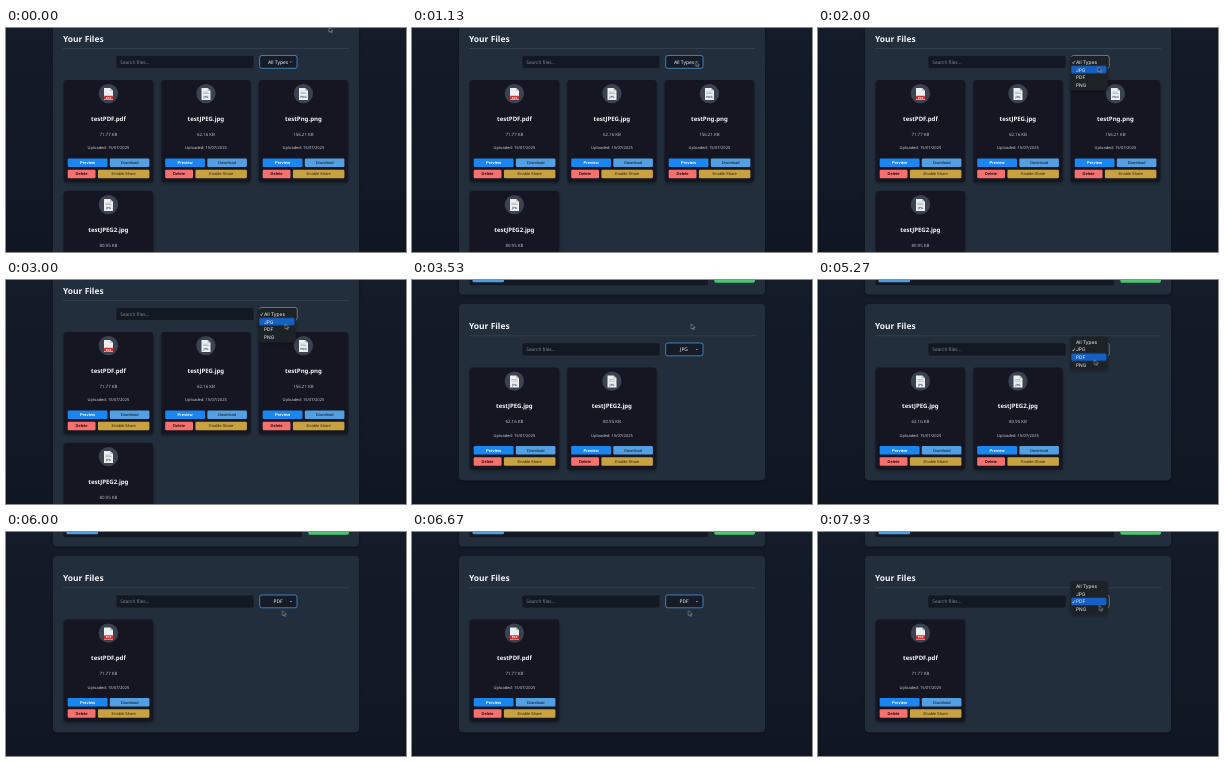
An HTML page for the animation above (8000 ms loop, 400 by 224 pixels).

```html
<!DOCTYPE html>
<html lang="en">
<head>
<meta charset="utf-8">
<title>Your Files</title>
<style>
  html, body { margin: 0; width: 100%; height: 100%; overflow: hidden; background: #121824; }
  svg { display: block; width: 100vw; height: 100vh; }
  text { font-family: "Noto Sans", "Open Sans", sans-serif; text-rendering: geometricPrecision; }
  .bold { font-weight: 700; }
  .mid { text-anchor: middle; }
  .menu text { font-family: Inter, Roboto, sans-serif; }
  .btn { font-family: "Liberation Sans", Arial, sans-serif; }

  .view, .menu { visibility: hidden; animation: 8s step-end infinite; }
  #all { animation-name: all; }
  #jpg { animation-name: jpg; }
  #pdf { animation-name: pdf; }
  #menuAll { animation-name: menuAll; }
  #menuJpg { animation-name: menuJpg; }
  #menuPdf { animation-name: menuPdf; }
  #cursor { animation: move 8s ease-in-out infinite; }

  @keyframes all { 0% { visibility: visible } 39.125%, 100% { visibility: hidden } }
  @keyframes jpg { 0% { visibility: hidden } 39.125% { visibility: visible } 70%, 100% { visibility: hidden } }
  @keyframes pdf { 0% { visibility: hidden } 70%, 100% { visibility: visible } }
  @keyframes menuAll { 0% { visibility: hidden } 19.125% { visibility: visible } 38.4%, 100% { visibility: hidden } }
  @keyframes menuJpg { 0% { visibility: hidden } 55.875% { visibility: visible } 69.2%, 100% { visibility: hidden } }
  @keyframes menuPdf { 0% { visibility: hidden } 95%, 100% { visibility: visible } }

  /* the highlight jumps one row down as the pointer crosses it */
  .menu .bar { animation: 8s step-end infinite; }
  #menuAll .bar { animation-name: barAll; }
  #menuJpg .bar { animation-name: barJpg; }
  @keyframes barAll { 0% { transform: translateY(0) } 22.6%, 100% { transform: translateY(7.6px) } }
  @keyframes barJpg { 0% { transform: translateY(0) } 60%, 100% { transform: translateY(7.6px) } }

  @keyframes move {
    0%, .875% { transform: translate(323.2px, -.8px) }
    7.5%, 12.5% { transform: translate(284px, 33px) }
    19.125% { transform: translate(281px, 35px) }
    24.5%, 26% { transform: translate(280.2px, 38.8px) }
    33.375%, 46.625% { transform: translate(279.3px, 44px) }
    54%, 56.5% { transform: translate(278px, 69px) }
    64.5%, 68.4% { transform: translate(276.5px, 79.8px) }
    74%, 83.375% { transform: translate(276.5px, 78.6px) }
    93%, 95% { transform: translate(281px, 69.5px) }
    99%, 100% { transform: translate(281.3px, 73.6px) }
  }
</style>
</head>
<body>
<svg id="stage" viewBox="0 0 400 224" preserveAspectRatio="none">
  <defs>
    <linearGradient id="page" x1="0" y1="0" x2="0" y2="1">
      <stop offset="0" stop-color="#141b29"/><stop offset="1" stop-color="#111722"/>
    </linearGradient>
    <filter id="shade" x="-10%" y="-10%" width="120%" height="125%">
      <feDropShadow dx="0" dy="1.2" stdDeviation="1.6" flood-color="#05080d" flood-opacity=".35"/>
    </filter>
  </defs>
  <rect width="400" height="224" fill="url(#page)"/>
  <g id="scene"></g>
  <path id="cursor" d="M0 0V5L1.2 3.9 2 5.7 2.9 5.3 2.1 3.6H3.7Z" fill="#0b0d10" stroke="#d5dade" stroke-width=".45" stroke-linejoin="round"/>
</svg>
<script>
  const SHIFT = 35.5, ROW = 7.6, SELECT_Y = 34;
  const TYPES = ['All Types', 'JPG', 'PDF', 'PNG'];
  const FILES = {
    pdf: ['testPDF.pdf', '71.77 KB'],
    jpeg: ['testJPEG.jpg', '62.16 KB'],
    png: ['testPng.png', '156.21 KB'],
    jpeg2: ['testJPEG2.jpg', '80.95 KB']
  };

  const rect = (x, y, w, h, fill, r = 0, extra = '') =>
    `<rect x="${x}" y="${y}" width="${w}" height="${h}" rx="${r}" fill="${fill}" ${extra}/>`;
  const text = (x, y, size, str, cls = '', fill = '#f2f5f8') =>
    `<text x="${x}" y="${y}" font-size="${size}" class="${cls}" fill="${fill}">${str}</text>`;
  const button = (x, y, w, fill, label, ink, cls = '') =>
    rect(x, y, w, 8.4, fill, 1.2) + text(x + w / 2, y + 5.6, 4, label, 'mid btn ' + cls, ink);

  function icon(type) {
    const page = '<path d="M40.2 8H46.4L49.2 10.8V20H40.2Z" fill="#eceff1"/>' +
      '<path d="M46.4 8V10.8H49.2Z" fill="#b4bcc4"/>';
    const label = type === 'pdf'
      ? rect(40.2, 15.8, 9, 3.8, '#d8322f', .4) + text(44.7, 18.8, 2.8, 'PDF', 'mid bold')
      : rect(41.6, 11.8, 5.2, .6, '#9aa3ab') + rect(41.6, 13.3, 6.2, .6, '#9aa3ab') +
        text(44.7, 18.4, 3, type === 'png' ? 'PNG' : 'JPG', 'mid bold', '#4d565f');
    return '<circle cx="44.6" cy="13.6" r="9.7" fill="#3a434f"/>' + page + label;
  }

  function card(key, i) {
    const [name, size] = FILES[key];
    const x = 57.8 + (i % 3) * 97.5, y = 52 + Math.floor(i / 3) * 111;
    return `<g transform="translate(${x} ${y})">` +
      rect(0, 0, 89.3, 102.3, '#131923', 3, 'filter="url(#shade)"') +
      icon(key) +
      text(44.6, 40.5, 6.05, name, 'mid bold') +
      text(44.6, 55.5, 4.4, size, 'mid', '#b3bbc4') +
      text(44.6, 69.3, 4, 'Uploaded: 15/07/2025', 'mid', '#c3cad1') +
      button(3.9, 78.5, 39.8, '#1a86ef', 'Preview', '#fff', 'bold') +
      button(46, 78.5, 39.6, '#529fe2', 'Download', '#0c1826') +
      button(3.9, 89.8, 27.8, '#f6716e', 'Delete', '#25090c', 'bold') +
      button(34.1, 89.8, 51.5, '#c8a140', 'Enable Share', '#33290f') + '</g>';
  }

  // Bottom edge of the upload panel above the list
  const upload = () =>
    rect(47, -20, 306, 34.6, '#232d3a', 4, 'filter="url(#shade)"') +
    rect(57.5, -10, 238.5, 15.2, '#131923', 1.5) +
    rect(60.5, -10, 31.5, 12.2, '#4f9ee3', 1.2) +
    rect(302.3, -10, 40.7, 12.8, '#4ec671', 1.8);

  function view(id, choice, files, scrolled) {
    return `<g class="view" id="${id}">` + (scrolled ? '' : upload()) +
      `<g transform="translate(0 ${scrolled ? 0 : SHIFT})">` +
      rect(47, -11.5, 306, scrolled ? 300 : 176.3, '#232d3a', 4, 'filter="url(#shade)"') +
      text(57, 13.7, 8.45, 'Your Files', 'bold') +
      rect(57, 20, 286, .7, '#3b4653') +
      rect(110, 27.5, 138, 13, '#131923', 2, 'stroke="#2c3643" stroke-width=".5"') +
      text(114.3, 35.6, 4.75, 'Search files...', '', '#7e8894') +
      rect(253.7, 27.5, 37.3, 12.8, '#151c27', 2, 'stroke="#4d9be0" stroke-width=".75"') +
      text(272, 35.8, 4.9, choice, 'mid') +
      '<path d="M284.1 33.5L285 34.4 285.9 33.5" fill="none" stroke="#d4dae0" stroke-width=".6"/>' +
      files.map(card).join('') + '</g></g>';
  }

  function menu(id, picked, y) {
    const top = y - picked * ROW;
    const items = TYPES.map((type, i) => text(258, top + i * ROW + 1.9, 4.85, type)).join('');
    return `<g class="menu" id="${id}">` +
      rect(253.7, y - 6.5, 37.3, 12.8, '#151c27', 2, 'stroke="#98a1aa" stroke-width=".5"') +
      rect(252.4, top - 5.3, 37.2, ROW * 4 + 3, '#1d2026', 2, 'stroke="#2b3038" stroke-width=".3" filter="url(#shade)"') +
      rect(253.3, y - 3.8, 35.2, ROW, '#1660c4', 1.2, 'class="bar"') + items +
      `<path d="M254.4 ${y + .4}l.9 1.2 1.5 -2.8" fill="none" stroke="#fff" stroke-width=".55"/></g>`;
  }

  document.getElementById('scene').innerHTML =
    view('all', 'All Types', ['pdf', 'jpeg', 'png', 'jpeg2'], true) +
    view('jpg', 'JPG', ['jpeg', 'jpeg2'], false) +
    view('pdf', 'PDF', ['pdf'], false) +
    menu('menuAll', 0, SELECT_Y) +
    menu('menuJpg', 1, SELECT_Y + SHIFT) +
    menu('menuPdf', 2, SELECT_Y + SHIFT);
</script>
</body>
</html>
```
